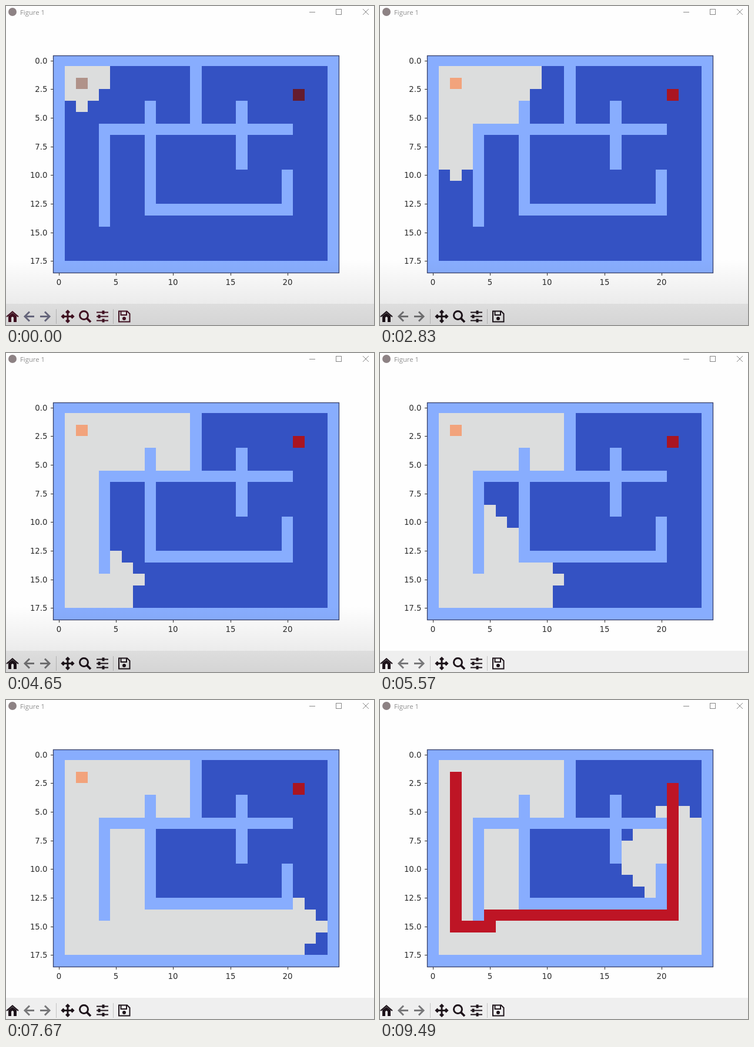
An HTML page with a canvas for the animation above (9.56 s loop, 626 by 542 pixels).

```html
<!DOCTYPE html>
<html>
<head>
<meta charset="utf-8">
<style>
html, body { margin: 0; width: 100%; height: 100%; overflow: hidden; background: #fefefe; }
canvas { display: block; }
</style>
</head>
<body>
<canvas id="stage" width="626" height="542"></canvas>
<script>
const g = document.getElementById('stage').getContext('2d');
const COLS = 25, ROWS = 19, LOOP = 9560, FRAME = 70;
const START = { c: 2, r: 2 }, GOAL = { c: 21, r: 3 };
const X = c => Math.round(80.2 + 19.44 * c);
const Y = r => Math.round(82.9 + 19.475 * r);

// Maze: a solid border plus straight inner walls
const across = (c, r, n) => ({ c, r, w: n, h: 1 });
const down = (c, r, n) => ({ c, r, w: 1, h: n });
const WALLS = [
  across(4, 6, 17), across(8, 13, 13), down(4, 6, 9), down(8, 4, 10),
  down(12, 1, 6), down(16, 4, 6), down(20, 10, 4)
];
const isWall = (c, r) => c < 1 || r < 1 || c > COLS - 2 || r > ROWS - 2 ||
  WALLS.some(w => c >= w.c && c < w.c + w.w && r >= w.r && r < w.r + w.h);

// Breadth-first search: each cell keeps the step at which it is found
function search() {
  const queue = [{ ...START, step: 0 }];
  const seen = new Set([START.c + ',' + START.r]);
  for (let i = 0; i < queue.length; i++) {
    const from = queue[i];
    for (const [dc, dr] of [[0, -1], [-1, 0], [0, 1], [1, 0]]) {
      const cell = { c: from.c + dc, r: from.r + dr, step: i + 1, from };
      const key = cell.c + ',' + cell.r;
      if (seen.has(key) || isWall(cell.c, cell.r)) continue;
      seen.add(key);
      if (cell.c === GOAL.c && cell.r === GOAL.r) return { cells: queue, end: cell };
      queue.push(cell);
    }
  }
}
const { cells, end } = search();

// One search step every 35.5 ms after an opening pause
const stepAt = t => Math.max(7, Math.floor(24.4 + (t - 2070) / 35.5));
const ramp = (t, from, to) => Math.min(1, Math.max(0, (t - from) / (to - from)));
const mix = (a, b, k) => `rgb(${a.map((v, i) => Math.round(v + (b[i] - v) * k))})`;

function box({ c, r, w = 1, h = 1 }, color) {
  g.fillStyle = color;
  g.fillRect(X(c), Y(r), X(c + w) - X(c), Y(r + h) - Y(r));
}

function line(color, width, ...strokes) {
  g.strokeStyle = color;
  g.lineWidth = width;
  g.beginPath();
  for (const [x, y, ...rest] of strokes) {
    g.moveTo(x, y);
    for (let i = 0; i < rest.length; i += 2) g.lineTo(rest[i], rest[i + 1]);
  }
  g.stroke();
}

function disc(color, x, y, r) {
  g.fillStyle = color;
  g.beginPath();
  g.arc(x, y, r, 0, 7);
  g.fill();
}

function text(s, x, y, align, color, font) {
  g.font = font;
  g.fillStyle = color;
  g.textAlign = align;
  g.fillText(s, x, y);
}

function titleBar() {
  disc('#8d8284', 11, 10, 7);
  text('Figure 1', 24, 15, 'left', '#8f8f8f', '11.3px "Open Sans", sans-serif');
  line('#888', 1, [516, 10.5, 526, 10.5], [607, 5, 617, 15], [617, 5, 607, 15]);
  g.strokeRect(561.5, 5.5, 9, 9);
}

function maze(t, warm) {
  const step = stepAt(t), wall = '#88adfe';
  box({ c: 0, r: 0, w: COLS, h: ROWS }, wall);
  box({ c: 1, r: 1, w: COLS - 2, h: ROWS - 2 }, '#3452c3');
  for (const cell of cells) if (cell.step <= step) box(cell, '#dcdddd');
  for (const w of WALLS) box(w, wall);
  box(START, mix([176, 146, 137], [242, 163, 124], warm));
  box(GOAL, mix([101, 28, 47], [170, 21, 33], warm));
  if (step >= end.step) for (let n = end; n; n = n.from) box(n, '#be1525');
}

function axes() {
  const ink = '#2c2c2c', font = '13.3px "DejaVu Sans", sans-serif';
  // trim the image to the frame
  g.fillStyle = '#fefefe';
  g.fillRect(78, 78, 492, 6);
  g.strokeStyle = '#36406a';
  g.lineWidth = 1.3;
  g.strokeRect(80.5, 84.5, 486, 369);
  for (let v = 0; v < ROWS - 1; v += 2.5) {
    const y = Y(v + 0.5);
    line(ink, 1, [76, y + 0.5, 80, y + 0.5]);
    text(v.toFixed(1), 70.5, y + 5, 'right', ink, font);
  }
  for (let v = 0; v < COLS - 1; v += 5) {
    const x = X(v + 0.5);
    line(ink, 1, [x + 0.5, 454, x + 0.5, 458]);
    text(v, x, 474, 'center', ink, font);
  }
}

// Arrow of given shaft length, pointing along the angle
function arrow(color, x, y, angle, tail, tip, size, width) {
  g.save();
  g.translate(x, y);
  g.rotate(angle);
  line(color, width, [tail, 0, tip, 0], [tip - size, -size, tip, 0, tip - size, size]);
  g.restore();
}

function toolbar(warm) {
  const ink = mix([70, 18, 36], [30, 20, 27], warm);
  const soft = mix([112, 112, 136], [120, 120, 122], warm);
  const mid = 527.5;
  g.fillStyle = '#efefef';
  g.fillRect(0, 506, 626, 36);

  // home
  line(ink, 2.2, [1, 528, 11, 519.5, 21, 528]);
  line(ink, 5, [6.5, 537, 6.5, 528, 11, 524.5, 15.5, 528, 15.5, 537]);

  // back, forward, pan
  arrow(soft, 40, mid, Math.PI, -8, 8, 8, 3);
  arrow(soft, 66, mid, 0, -8, 8, 8, 3);
  for (let i = 0; i < 4; i++) arrow(ink, 105, mid, i * Math.PI / 2, 0, 9.5, 3, 3);
  for (const x of [85.5, 182.5]) line('#c4c4c4', 1, [x, 515, x, 540]);

  // zoom
  line(ink, 3.8, [137.5, 530.5, 144, 537]);
  g.lineWidth = 3;
  g.beginPath();
  g.arc(132.5, 525.5, 7, 0, 7);
  g.stroke();

  // sliders
  for (let i = -1; i <= 1; i++) {
    const y = mid + 7 * i, x = 158.5 + 7 * Math.abs(i);
    line(ink, 2, [154, y, 174, y]);
    line(ink, 4, [x, y - 3, x, y + 3]);
  }

  // save
  line(ink, 2, [192, 518.5, 206, 518.5, 210.5, 523, 210.5, 536.5, 192, 536.5, 192, 517.5],
    [195.5, 519, 195.5, 525, 205, 525, 205, 519]);
  disc(ink, 201, 531, 3);
}

function shade(k) {
  const fade = g.createLinearGradient(0, 430, 0, 542);
  for (let s = 0; s <= 1; s += 0.25) fade.addColorStop(s, `rgba(0,0,0,${0.11 * k * s})`);
  g.fillStyle = fade;
  g.fillRect(0, 430, 626, 112);
}

function draw(now) {
  const t = Math.floor((now % LOOP - 170) / FRAME) * FRAME + 170;
  const warm = ramp(t, 1440, 2410);
  g.fillStyle = '#fefefe';
  g.fillRect(0, 0, 626, 542);
  titleBar();
  maze(t, warm);
  axes();
  toolbar(warm);
  shade(1 - ramp(t, 4790, 5070));
}

const begin = performance.now();
function tick() {
  draw(performance.now() - begin);
  requestAnimationFrame(tick);
}
tick();
</script>
</body>
</html>
```
